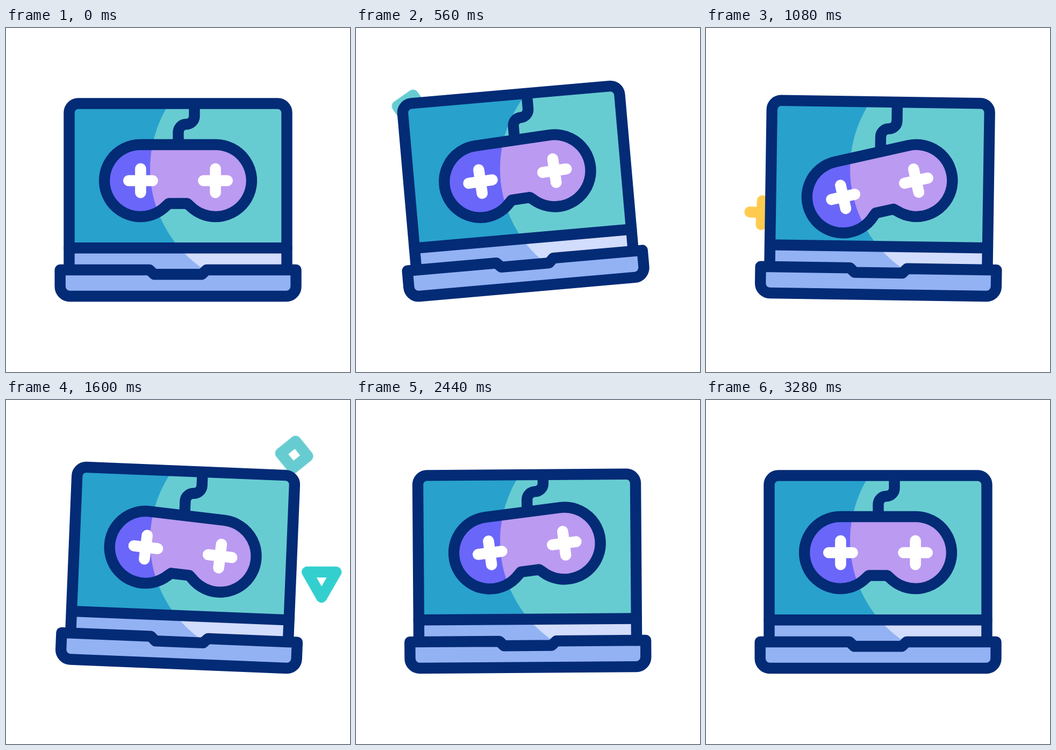
Animation of 640 by 640 pixels, one loop 3.6 s. Source, as an HTML page without scripts:

```html
<!DOCTYPE html>
<html lang="en">
<head>
<meta charset="utf-8">
<title>Rocking laptop</title>
<style>
@property --tilt { syntax: '<angle>'; inherits: true; initial-value: 0deg; }
@property --turn { syntax: '<angle>'; inherits: true; initial-value: 0deg; }
@property --drop { syntax: '<length>'; inherits: true; initial-value: 0px; }
@property --slack { syntax: '<length>'; inherits: true; initial-value: 0px; }

html, body { margin: 0; height: 100%; overflow: hidden; background: #fff; }
svg {
  display: block; width: 100vw; height: 100vh;
  fill: none; stroke-linecap: round; stroke-linejoin: round;
  animation: 3600ms cubic-bezier(.37, 0, .63, 1) infinite;
  animation-name: tilt, turn, drop, slack;
}

/* Rocks on the left foot for negative tilt, on the right foot for positive */
.laptop {
  transform:
    translate(522px, 509px) rotate(max(0deg, var(--tilt)))
    translate(-404px, 0) rotate(min(0deg, var(--tilt)))
    translate(-118px, -509px);
}
.pad {
  transform:
    translate(320px, calc(284px + var(--drop))) rotate(var(--turn))
    translate(-320px, -284px);
}
.cord { transform: translateY(var(--slack)); }
.line { stroke: #032b76; stroke-width: 20.4; }
.plus { stroke: #fff; stroke-width: 20.6; }

@keyframes tilt {
  0% { --tilt: 0deg; }
  15% { --tilt: -5deg; }
  38.3% { --tilt: 3.1deg; }
  60% { --tilt: -1deg; }
  73.9%, 100% { --tilt: 0deg; }
}
@keyframes turn {
  0%, 8.3% { --turn: 0deg; }
  30% { --turn: -13.4deg; }
  50.6% { --turn: 9deg; }
  67.8% { --turn: -7deg; }
  79.4% { --turn: 5.5deg; }
  90%, 100% { --turn: 0deg; }
}
@keyframes drop {
  0% { --drop: 0px; }
  33.3% { --drop: 18.5px; }
  58.3% { --drop: -11px; }
  81.7%, 100% { --drop: 0px; }
}
@keyframes slack {
  0% { --slack: 0px; }
  33.3% { --slack: 11.5px; }
  58.3% { --slack: -11px; }
  81.7%, 100% { --slack: 0px; }
}

/* Pieces thrown out from behind the laptop; --t is when each passes its anchor */
.toss {
  stroke-width: 20.4;
  animation: toss 3600ms linear calc(var(--t) - 3888ms) infinite;
}
.square { stroke: #67ccd1; }
.cross { stroke: #ffcb4f; }
.tri { stroke: #33cfcf; }
@keyframes toss {
  0% {
    transform: translate(calc(var(--dx) * -1.6), calc(var(--dy) * -1.6))
      rotate(calc(var(--r) - 40deg)) scale(.4);
  }
  8% { transform: translate(0px, 0px) rotate(var(--r)) scale(1); }
  16% {
    transform: translate(var(--dx), var(--dy))
      rotate(calc(var(--r) + 40deg)) scale(1);
  }
  18%, 100% {
    transform: translate(calc(var(--dx) * 1.1), calc(var(--dy) * 1.1))
      rotate(calc(var(--r) + 50deg)) scale(0);
  }
}
</style>
</head>
<body>
<svg viewBox="0 0 640 640">
  <defs>
    <clipPath id="glow"><circle cx="493" cy="262" r="225"/></clipPath>
    <clipPath id="screen"><rect x="120" y="140" width="400" height="262"/></clipPath>
    <path id="lid" d="M117.5 455V157.500a17 17 0 0 1 17-17H505.500a17 17 0 0 1 17 17V455"/>
    <path id="body" d="M250 217H390A67 67 0 1 1 342.600 331.400L337 326.500H303L297.400 331.400A67 67 0 1 1 250 217Z"/>
    <path id="plus" d="M-22.200 0H22.200M0-22.200V22.200"/>
    <rect id="square" x="-18" y="-18" width="36" height="36"/>
    <path id="tri" d="M-27-15H27L0 32Z"/>
  </defs>

  <g transform="translate(102 150)"><use href="#square" class="toss square" style="--t:560ms;--dx:-61px;--dy:-49px;--r:-35deg"/></g>
  <g transform="translate(520 370)"><use href="#plus" class="toss cross" style="--t:630ms;--dx:70px;--dy:6px;--r:10deg"/></g>
  <g transform="translate(104 343.500)"><use href="#plus" class="toss cross" style="--t:1080ms;--dx:-66px;--dy:6px;--r:3deg"/></g>
  <g transform="translate(536 102)"><use href="#square" class="toss square" style="--t:1600ms;--dx:46px;--dy:-37px;--r:-39deg"/></g>
  <g transform="translate(587 335)"><use href="#tri" class="toss tri" style="--t:1600ms;--dx:52px;--dy:6px;--r:0deg"/></g>
  <g transform="translate(132 270)"><use href="#tri" class="toss tri" style="--t:1670ms;--dx:-76px;--dy:-4px;--r:0deg"/></g>
  <g transform="translate(538 258.500)"><use href="#plus" class="toss cross" style="--t:2060ms;--dx:68px;--dy:4px;--r:6deg"/></g>
  <g transform="translate(140 250)"><use href="#square" class="toss square" style="--t:2075ms;--dx:-80px;--dy:-6px;--r:-35deg"/></g>

  <g class="laptop">
    <use href="#lid" fill="#28a1cd"/>
    <path d="M118 409H522V455H118Z" fill="#93b2f4"/>
  </g>
  <g clip-path="url(#glow)">
    <g class="laptop">
      <use href="#lid" fill="#67ccd1"/>
      <path d="M118 409H522V455H118Z" fill="#d2dcfd"/>
    </g>
  </g>

  <g class="laptop">
    <g clip-path="url(#screen)">
      <path class="line cord" d="M350.500 128V164a15 15 0 0 1-15 15a15 15 0 0 0-15 15V245"/>
    </g>
    <use href="#lid" class="line"/>
    <path class="line" d="M117.500 409.300H522.500"/>
    <path class="line" fill="#93b2f4" d="M100.700 450H267L275.500 458.300H364.500L373 450H539.500V481a18 18 0 0 1-18 18H118.700a18 18 0 0 1-18-18Z"/>
    <use href="#body" class="pad" fill="#6a66f9"/>
  </g>
  <g clip-path="url(#glow)">
    <g class="laptop"><use href="#body" class="pad" fill="#bb9af1"/></g>
  </g>
  <g class="laptop">
    <g class="pad">
      <use href="#body" class="line"/>
      <use href="#plus" class="plus" x="250.400" y="284"/>
      <use href="#plus" class="plus" x="389.600" y="284"/>
    </g>
  </g>
</svg>
</body>
</html>
```
